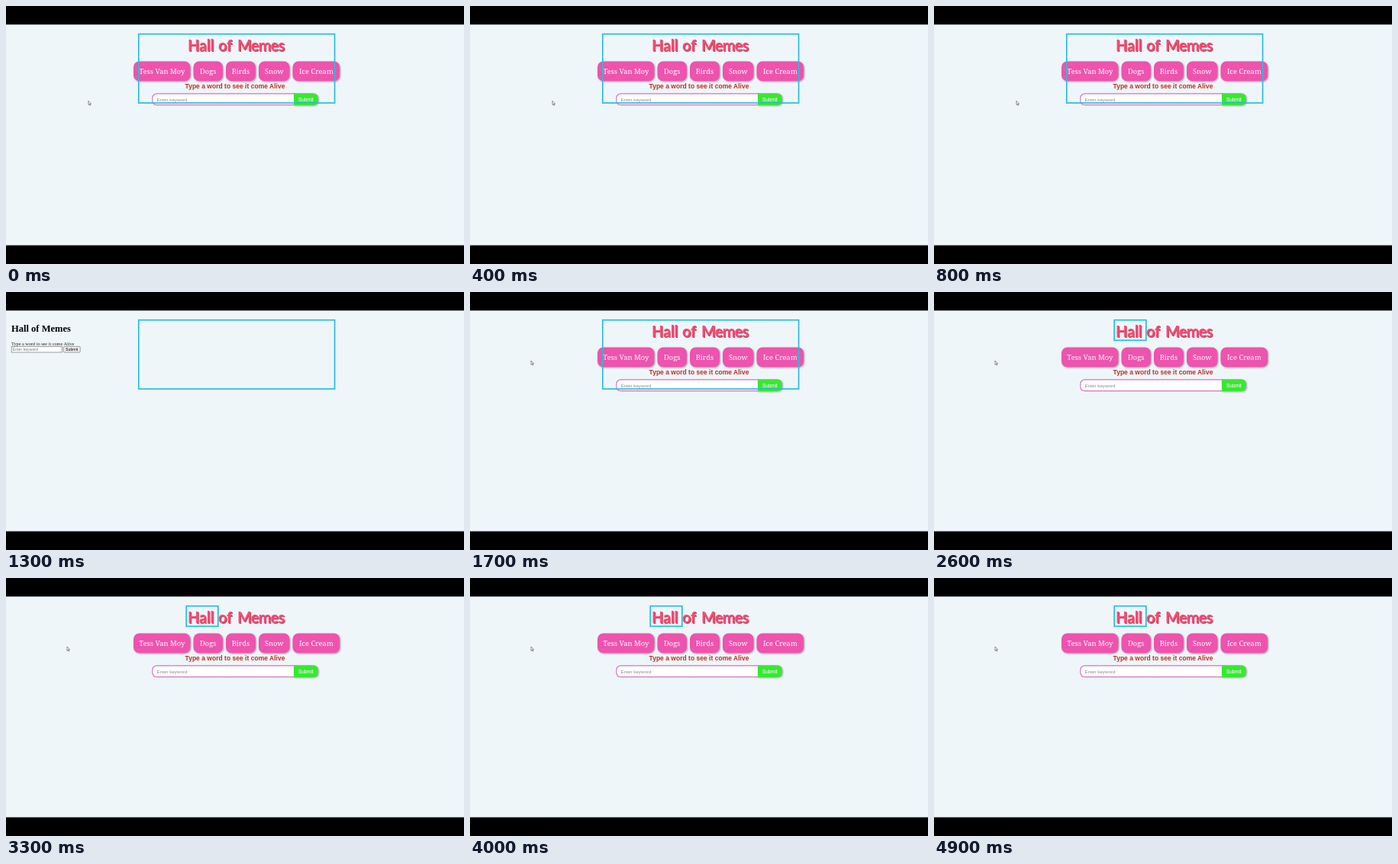
These frames come from a looping animation (600 by 338 pixels, 5 s). An HTML page:

```html
<!DOCTYPE html>
<html lang="en">
<head>
<meta charset="utf-8">
<title>Hall of Memes</title>
<style>
  html, body { margin: 0; width: 100%; height: 100%; overflow: hidden; background: #000; }
  svg { display: block; width: 100%; height: 100%; }
  .sans { font-family: "Liberation Sans", Arial, sans-serif; }
  .serif { font-family: "Liberation Serif", Times, serif; }
  .title { font: 700 20px Lato, sans-serif; letter-spacing: -.25px; fill: #f8487c; text-shadow: .9px .9px #bd4a48; }
  .tabs { font: 9.4px "Noto Serif", serif; fill: #fff; text-anchor: middle; }
  .tabs rect { fill: #ee53ae; }
  .raised { filter: drop-shadow(1px 1.3px 1px #0005); }
</style>
</head>
<body>
<svg viewBox="0 0 600 338">
  <rect y="24.3" width="600" height="289.2" fill="#eef6fa"/>

  <g id="styled">
    <text class="title" y="59"><tspan x="238">Hall</tspan><tspan x="278">of</tspan><tspan x="303" letter-spacing="-.8" style="letter-spacing:-.8px">Memes</tspan></text>
    <g id="tabs" class="tabs"></g>
    <g class="sans">
      <text x="300" y="107.6" font-size="8.54" font-weight="700" fill="#bf2f20" text-anchor="middle">Type a word to see it come Alive</text>
      <path d="M378 114.9H198q-6.2 0-6.2 6.2v2.4q0 6.2 6.2 6.2H378z" fill="#fff" stroke="#d374b9" stroke-width="1.2"/>
      <path class="raised" d="M377 114.3h25q7 0 7 7v1.8q0 7-7 7h-25z" fill="#3be633"/>
      <text x="197.6" y="124.6" font-size="6.26" fill="#8a8a8a">Enter keyword</text>
      <text x="383" y="124.9" font-size="6.4" fill="#fff">Submit</text>
    </g>
  </g>

  <g id="plain">
    <g class="serif">
      <text x="7" y="52" font-size="12.54" font-weight="700">Hall of Memes</text>
      <text x="7" y="70" font-size="6.25" fill="#222">Type a word to see it come Alive</text>
    </g>
    <g class="sans" font-size="5.2" stroke-width=".7">
      <rect x="7.2" y="71.4" width="66.4" height="7.6" fill="#fff" stroke="#777"/>
      <rect x="75.4" y="71.4" width="21.8" height="7.6" rx="1" fill="#efefef" stroke="#777"/>
      <text x="8.8" y="77" fill="#777">Enter keyword</text>
      <text x="78.1" y="77">Submit</text>
    </g>
  </g>

  <rect id="frame" fill="none" stroke="#27bedb" stroke-width="1.7"/>
  <path id="cursor" d="M0 0v5.2l1.2-1.1.9 1.9.8-.4-.9-1.8h1.6z" fill="#fff" stroke="#444" stroke-width=".6"/>
</svg>
<script>
const $ = id => document.getElementById(id);

// label, left, right
const tabs = [
  ["Tess Van Moy", 167, 241.5],
  ["Dogs", 245.5, 284],
  ["Birds", 288, 327],
  ["Snow", 331, 371.5],
  ["Ice Cream", 375.5, 437.2]
];
$("tabs").innerHTML = tabs.map(([label, left, right]) =>
  `<rect class="raised" x="${left}" y="72.6" width="${right - left}" height="25.6" rx="7.5"/>
   <text x="${(left + right) / 2}" y="88.7">${label}</text>`).join("");

const setAttrs = (el, attrs) => {
  for (const key in attrs) el.setAttribute(key, attrs[key]);
};
const show = (el, on) => { el.style.display = on ? "" : "none"; };

const wide = { x: 173.8, y: 36.7, width: 256.8, height: 90.3 };
const narrow = { x: 236.2, y: 36.7, width: 41.6, height: 26.6 };

function move(t, start, end, from, to) {
  const p = Math.min(1, Math.max(0, (t - start) / (end - start)));
  const e = p * p * (3 - 2 * p);
  return from.map((v, i) => v + (to[i] - v) * e);
}

function draw(now) {
  const t = now % 5000;
  const reloading = t >= 1300 && t < 1400;
  show($("plain"), reloading);
  show($("styled"), !reloading);
  setAttrs($("frame"), t < 2100 ? wide : narrow);

  // The pointer leaves through the top edge to reload, then comes back.
  const [x, y] = t < 1300
    ? move(t, 850, 1150, [108, 124.3], [41, 22])
    : move(t, 1450, 1650, [48, 42], [80, 90]);
  show($("cursor"), t < 1150 || t >= 1500);
  $("cursor").setAttribute("transform", `translate(${x} ${y})`);
  requestAnimationFrame(draw);
}
draw(performance.now());
</script>
</body>
</html>
```
